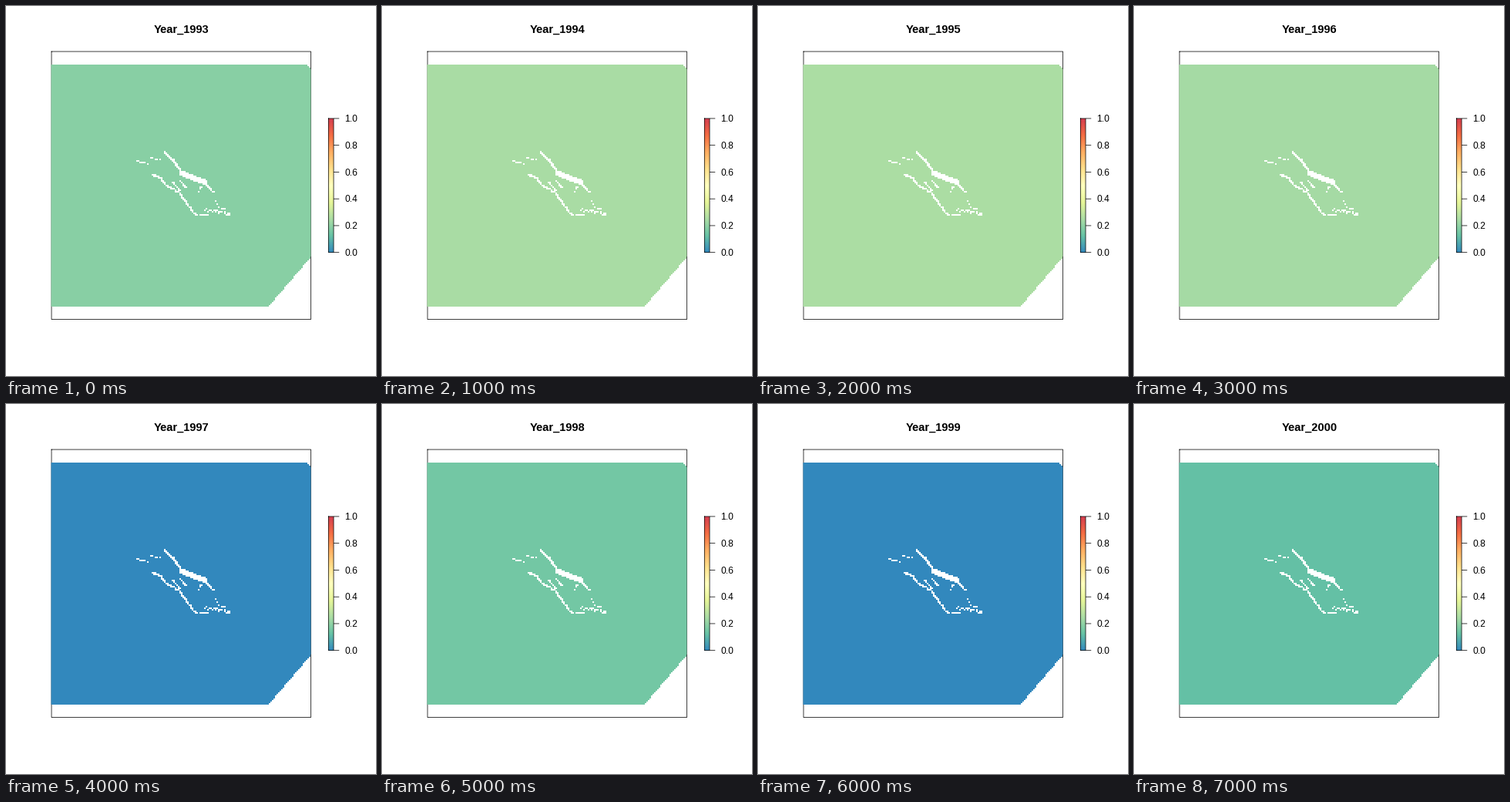
These frames come from a looping animation (480x480 px, 8 s). A matplotlib script:

```python
import numpy as np
import matplotlib.pyplot as plt
from matplotlib.animation import FuncAnimation
from matplotlib.colors import LinearSegmentedColormap
from matplotlib.patches import Rectangle

SIZE = 480
LINE = dict(color="black", lw=0.75, snap=False, zorder=3)
FONT = dict(family="Liberation Sans", color="black", va="baseline")
CELL, LEFT, TOP, COLS, ROWS = 2, 59, 76, 168, 157
RIGHT, BOTTOM = LEFT + COLS * CELL, TOP + ROWS * CELL
BOX = (59.04, 59.04, 395.52, 406.56)
KEY = (418.3, 145.92, 425.04, 319.68)
FIRST_YEAR = 1993
VALUES = [0.19, 0.249, 0.252, 0.242, 0.0, 0.15, 0.0, 0.122]

cmap = LinearSegmentedColormap.from_list("spectral9", [
    "#3288bd", "#66c2a5", "#abdda4", "#e6f598", "#ffffbf",
    "#fee08b", "#fdae61", "#f46d43", "#d53e4f"], N=256)

# Gaps in the map: key points of a ridge, its width, share of cells cleared
RIDGES = [
    ([(206, 190), (217, 200), (228, 216)], 3, 1),
    ([(228, 217), (240, 222), (257, 228)], 7, 1),
    ([(257, 228), (269, 241)], 2.4, 0.9),
    ([(191, 219), (200, 223), (209, 233), (225, 243), (246, 271),
      (261, 271)], 3, 0.85),
    ([(217, 229), (225, 239)], 2, 1),
    ([(226, 227), (233, 235)], 2, 1),
    ([(170, 201), (175, 203), (184, 204)], 2, 0.8),
    ([(187, 197), (201, 199)], 2, 0.5),
    ([(254, 233), (249, 244)], 2, 0.5),
    ([(272, 251), (276, 262), (284, 263)], 2, 0.5),
    ([(260, 265), (274, 267), (290, 270)], 4, 0.5),
]


def distance(x, y, a, b):
    """Distance from points to the segment a-b."""
    dx, dy = b[0] - a[0], b[1] - a[1]
    t = ((x - a[0]) * dx + (y - a[1]) * dy) / (dx * dx + dy * dy)
    t = np.clip(t, 0, 1)
    return np.hypot(x - a[0] - t * dx, y - a[1] - t * dy)


def build_land():
    rng = np.random.default_rng(7)
    x, y = np.meshgrid(LEFT + CELL * (np.arange(COLS) + 0.5),
                       TOP + CELL * (np.arange(ROWS) + 0.5))
    land = x < 396 - (y - 325) * 55.5 / 65
    land &= x < 389 + (y - 76) * 1.2
    for points, width, share in RIDGES:
        gap = np.min([distance(x, y, a, b)
                      for a, b in zip(points, points[1:])], axis=0)
        land &= (gap > width / 2) | (rng.random(x.shape) > share)
    return land


fig = plt.figure(figsize=(SIZE / 72, SIZE / 72), dpi=72, facecolor="white")
ax = fig.add_axes([0, 0, 1, 1])
ax.axis("off")


def outline(x0, y0, x1, y1):
    ax.plot([x0, x1, x1, x0, x0], [y0, y0, y1, y1, y0],
            solid_joinstyle="miter", solid_capstyle="projecting", **LINE)


outline(*BOX)

# The map lies over the box and half covers its sides
pixels = np.zeros((ROWS, COLS, 4))
pixels[..., 3] = build_land()
raster = ax.imshow(pixels, extent=(LEFT, RIGHT, BOTTOM, TOP),
                   interpolation="nearest", zorder=4)
sides = [Rectangle((x, top), 1, end - top, lw=0, alpha=0.5, zorder=4)
         for x, top, end in [(LEFT - 1, TOP, BOTTOM), (RIGHT, 82, 325)]]
for side in sides:
    ax.add_patch(side)

# Colour key
x0, y0, x1, y1 = KEY
ax.imshow(np.linspace(1, 0, 256)[:, None], cmap=cmap, vmin=0, vmax=1,
          extent=(x0, x1, y1, y0), interpolation="nearest", zorder=2)
outline(*KEY)
for v in np.linspace(0, 1, 6):
    y = y1 + (y0 - y1) * v
    ax.plot([x1, x1 + 7.2], [y, y], solid_capstyle="butt", **LINE)
    ax.text(x1 + 14.2, y + 4.3, f"{v:.1f}", size=12, ha="left", **FONT)

title = ax.text(227.4, 35, "", weight="bold", size=14.6, ha="center", **FONT)

ax.set_aspect("auto")
ax.set_xlim(0, SIZE)
ax.set_ylim(SIZE, 0)


def draw(i):
    color = cmap(VALUES[i])
    pixels[..., :3] = color[:3]
    raster.set_data(pixels)
    for side in sides:
        side.set_facecolor(color)
    title.set_text(f"Year_{FIRST_YEAR + i}")
    return [raster, title, *sides]


anim = FuncAnimation(fig, draw, frames=len(VALUES), interval=1000,
                     repeat=True, repeat_delay=0)
plt.show()
```
